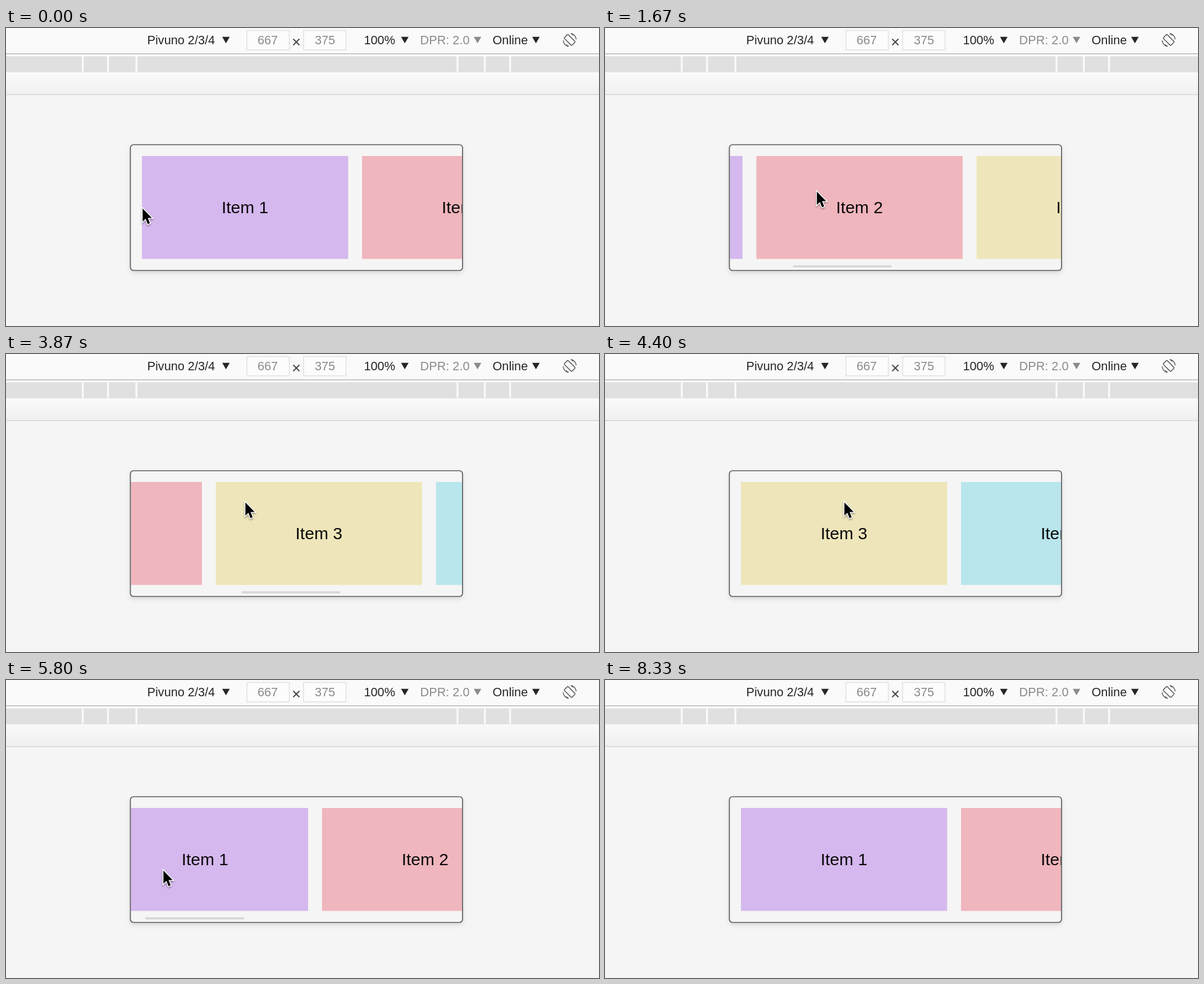
An HTML page for the animation above (8.47 s loop, 1056 px wide and 531 px high).

```html
<!DOCTYPE html>
<html lang="en">
<head>
<meta charset="utf-8">
<title>Carousel scroll</title>
<style>
  html, body { margin: 0; width: 100%; height: 100%; overflow: hidden; background: #f5f5f5; }
  svg { display: block; width: 100%; height: 100%; }
  text { font-family: "Liberation Sans", Arial, sans-serif; }
  .tool { font-size: 21.7px; fill: #252525; }
  .dim { fill: #8b8b8b; }
  .label { font-size: 30px; text-anchor: middle; fill: #080808; }
  #panel { filter: drop-shadow(0 4px 4px rgba(0, 0, 0, .13)); }
  #cursor { filter: drop-shadow(0 2px 1.5px rgba(0, 0, 0, .35)); }
</style>
</head>
<body>
<svg id="stage" viewBox="0 0 1056 531">
  <defs>
    <linearGradient id="fade" x2="0" y2="1">
      <stop stop-color="#fafafa"/>
      <stop offset="1" stop-color="#f0f0f0"/>
    </linearGradient>
    <clipPath id="view"><rect x="222.5" y="209" width="589.5" height="222.5" rx="4"/></clipPath>
  </defs>

  <rect width="1056" height="531" fill="#f5f5f5"/>
  <rect width="1056" height="51" fill="#fafafa"/>
  <rect y="45" width="1056" height="2" fill="#c6c6c6"/>
  <rect y="50.5" width="1056" height="28.5" fill="#e0e0e0"/>
  <g id="marks" fill="#fafafa"></g>
  <rect y="79" width="1056" height="39" fill="url(#fade)"/>
  <rect y="118" width="1056" height="1.2" fill="#cecece"/>

  <g fill="#fcfcfc" stroke="#e2e2e2" stroke-width="1.6">
    <rect x="429" y="4.5" width="75.5" height="34.5"/>
    <rect x="530" y="4.5" width="75.5" height="34.5"/>
  </g>
  <g class="tool">
    <text x="251.5" y="29">Pivuno 2/3/4</text>
    <text x="466" y="29" class="dim" text-anchor="middle">667</text>
    <text x="568" y="29" class="dim" text-anchor="middle">375</text>
    <text x="637.5" y="29">100%</text>
    <text x="737.5" y="29" class="dim">DPR: 2.0</text>
    <text x="866.5" y="29">Online</text>
  </g>
  <path d="M511.5 19.5l11 11m0-11l-11 11" stroke="#4a4a4a" stroke-width="2.2"/>
  <g id="arrows"></g>
  <g transform="translate(1003.8 21.3)" fill="none" stroke="#5c5c5c" stroke-width="1.6">
    <rect x="-4.8" y="-9.6" width="9.6" height="19.2" rx="1.5" transform="rotate(-45)"/>
    <path d="M2.5 -11.6A11.8 11.8 0 0 1 11.6 -1M-2.5 11.6A11.8 11.8 0 0 1 -11.6 1"/>
    <path d="M2 -11.6l4.5 3.2M-2 11.6l-4.5 -3.2"/>
  </g>

  <rect id="panel" x="221.5" y="208" width="591.5" height="224" rx="5.5" fill="#f5f5f5"/>
  <g clip-path="url(#view)">
    <g id="items"></g>
    <rect id="bar" y="422.8" width="175.5" height="3.6" rx="1" fill="#d5d7d6"/>
  </g>
  <rect x="221.5" y="208" width="591.5" height="224" rx="5.5" fill="none" stroke="#58595b" stroke-width="1.7"/>
  <path id="cursor" d="M0 0V23.5L5.3 18.5L9.2 28L13 26.3L9.2 17H16.5Z"
    fill="#000" stroke="#fff" stroke-width="3" paint-order="stroke"/>
</svg>
<script>
const LOOP = 8470, FPS = 15, PITCH = 392;
const $ = id => document.getElementById(id);
const smooth = u => (u = Math.min(1, Math.max(0, u)), u * u * (3 - 2 * u));

function add(parent, tag, attrs, text = '') {
  const el = document.createElementNS('http://www.w3.org/2000/svg', tag);
  for (const key in attrs) el.setAttribute(key, attrs[key]);
  el.textContent = text;
  parent.append(el);
}

for (const x of [135, 180, 230.5, 802.3, 851, 896])
  add($('marks'), 'rect', { x, y: 50, width: 3.4, height: 28 });

for (const x of [385, 703.5, 833, 937])
  add($('arrows'), 'path', { d: `M${x} 15.8h13.4l-6.7 11.4z`, fill: x === 833 ? '#8b8b8b' : '#252525' });

['#d5b8ee', '#f0b6bd', '#eee6ba', '#b9e6ec', '#c5edc0'].forEach((fill, i) => {
  const x = 242 + i * PITCH;
  add($('items'), 'rect', { x, y: 228, width: 367.3, height: 183.5, fill });
  add($('items'), 'text', { x: x + 183.6, y: 329.5, class: 'label' }, `Item ${i + 1}`);
});

// Flings: start, duration, distance, start and end of the scrollbar fade.
const flings = [
  [1164, 600, PITCH, 2100, 2400],
  [3561, 500, PITCH, 4180, 4390],
  [5301, 613, -2 * PITCH, 5930, 6130]
];

// Pointer stops: time, x, y.
const stops = [
  [0, 242, 319], [300, 213, 324], [800, 465, 298], [1130, 465, 298], [1300, 376, 289],
  [1780, 376, 289], [2450, 208, 312], [2650, 224, 308], [3250, 495, 270], [3560, 495, 270],
  [3740, 425, 262], [4450, 425, 262], [5050, 209, 331], [5270, 228, 336], [5390, 279, 337],
  [6170, 279, 337], [6650, 160, 318], [6980, 208, 304], [7130, 266, 294],
  [7570, 266, 294], [8300, 963, 535]
];

function pointer(t) {
  const i = stops.findIndex(s => s[0] > t);
  if (i < 0) return null;
  const [t0, x0, y0] = stops[i - 1], [t1, x1, y1] = stops[i];
  const u = smooth((t - t0) / (t1 - t0));
  return [x0 + (x1 - x0) * u, y0 + (y1 - y0) * u];
}

function draw(t) {
  let scroll = 0, alpha = 0;
  for (const [start, span, dist, fadeIn, fadeOut] of flings) {
    scroll += dist * smooth((t - start) / span);
    if (t > start && t < fadeOut) alpha = Math.min(1, (fadeOut - t) / (fadeOut - fadeIn));
  }
  $('items').setAttribute('transform', `translate(${-scroll} 0)`);
  $('bar').setAttribute('x', 227 + scroll * 0.2955);
  $('bar').setAttribute('opacity', alpha);

  const p = pointer(t);
  $('cursor').setAttribute('visibility', p ? 'visible' : 'hidden');
  if (p) $('cursor').setAttribute('transform', `translate(${p[0] + 1.3} ${p[1] + 2.5})`);
}

function tick() {
  const t = performance.now() % LOOP;
  draw(Math.floor((t + 4) * FPS / 1000) * 1000 / FPS);
  requestAnimationFrame(tick);
}
tick();
</script>
</body>
</html>
```
